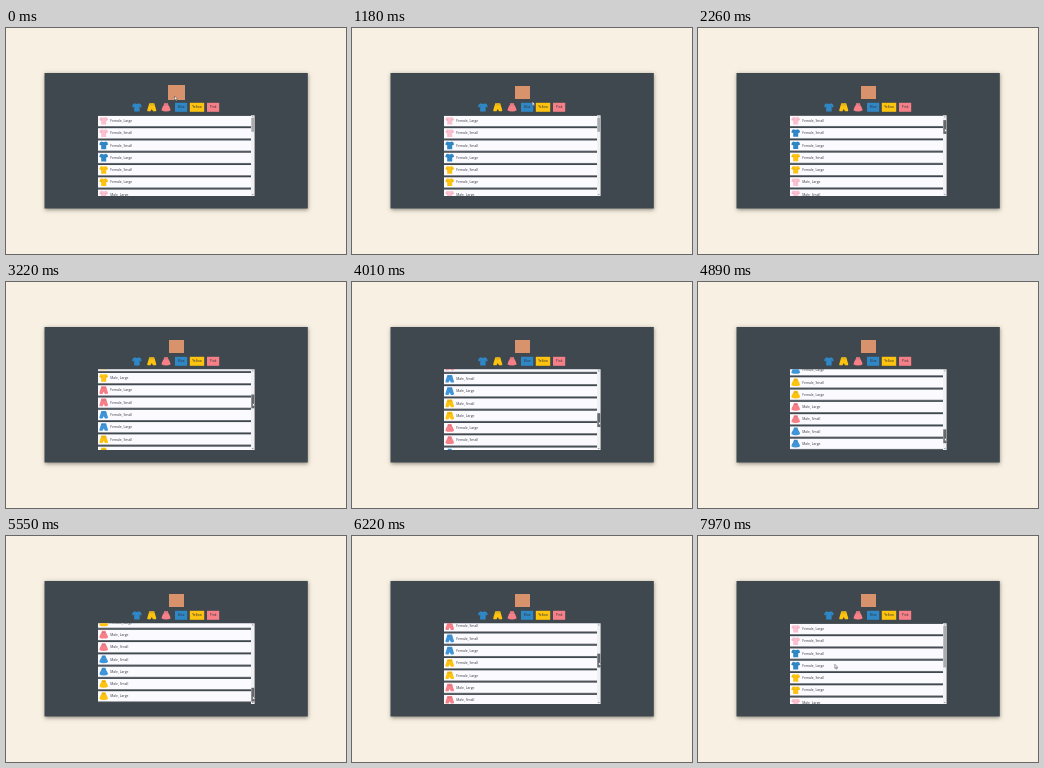
Write an HTML page with a canvas that moves like this. It is 340 px wide and 226 px high and loops after 8 s.

```html
<!DOCTYPE html>
<html lang="en">
<head>
<meta charset="utf-8">
<title>Clothes filter</title>
<style>
  html, body { margin: 0; width: 100%; height: 100%; overflow: hidden; background: #f8f1e3; }
  canvas { display: block; width: 340px; height: 226px; }
</style>
</head>
<body>
<canvas id="stage"></canvas>
<script>
const W = 340, H = 226, LOOP = 8000;
const canvas = document.getElementById('stage');
const ctx = canvas.getContext('2d');
const dpr = window.devicePixelRatio || 1;
canvas.width = W * dpr;
canvas.height = H * dpr;

const PANEL = '#3f484e', ROW = '#fbfaff';
const BLUE = '#2f87c6', YELLOW = '#fdc30f', PINK = '#f77f88';
const SHIRT_PINK = '#fbc0cf', LIST_BLUE = '#3f95d8';
const FONT = '"Open Sans", Lato, sans-serif';

const PITCH = 12.28, TOP = 87.9, ROW_H = 10.2;
const LIST = { x: 92, y: 87.3, w: 153, h: 80.7 };
const TRACK = { x: 245, y: 90, h: 75.6 };
const MAX_SCROLL = 362.5;
const FILTER_AT = 7200, DRAG_FROM = 2140, DRAG_TO = 6660;

// One group of twelve per garment: six female, then six male
const items = [];
for (const kind of ['shirt', 'shorts', 'skirt']) {
  for (const sex of ['Female', 'Male']) {
    const pink = kind === 'shirt' ? SHIRT_PINK : PINK;
    const blue = kind === 'shirt' ? BLUE : LIST_BLUE;
    [[pink, 'Large'], [pink, 'Small'], [blue, 'Small'],
     [blue, 'Large'], [YELLOW, 'Small'], [YELLOW, 'Large']]
      .forEach(([color, size]) => items.push({ kind, color, label: `${sex}, ${size}` }));
  }
}

const scrollKeys = [
  [2140, 0], [2260, 12.3], [2720, 58], [2890, 64], [3220, 132], [3380, 134],
  [4010, 241.5], [4550, 309], [5010, 346], [5300, MAX_SCROLL],
  [5750, MAX_SCROLL], [6250, 150], [6640, 0]
];
const cursorKeys = [
  [0, 168.5, 68], [800, 168.5, 68], [1500, 190, 78], [1930, 214, 80], [2140, 246.5, 98]
];
const releaseKeys = [
  [6660, 246.5, 98], [6800, 244, 98], [7130, 130.5, 78],
  [7600, 130.5, 78], [7930, 136.8, 128.3]
];

function at(keys, t, col = 1) {
  if (t <= keys[0][0]) return keys[0][col];
  for (let i = 1; i < keys.length; i++) {
    const a = keys[i - 1], b = keys[i];
    if (t <= b[0]) return a[col] + (b[col] - a[col]) * (t - a[0]) / (b[0] - a[0]);
  }
  return keys[keys.length - 1][col];
}

function rect(x, y, w, h, color) {
  ctx.fillStyle = color;
  ctx.fillRect(x, y, w, h);
}

function text(str, x, y, size, color, align = 'left') {
  ctx.font = `${size}px ${FONT}`;
  ctx.textAlign = align;
  ctx.textBaseline = 'middle';
  ctx.fillStyle = color;
  ctx.fillText(str, x, y);
}

// Garment outlines on a 10 by 9 box
const shapes = {
  shirt: new Path2D('M3 .3Q5 1.6 7 .3L9 1.2L10 3.7L8.1 4.5L7.8 4V8.8H2.2V4L1.9 4.5L0 3.7L1 1.2Z'),
  shorts: new Path2D('M2.4 .3H7.6L9.8 7.5Q9.7 8.8 8.4 8.8H6.3L5 6.2L3.7 8.8H1.6Q.3 8.8 .2 7.5Z'),
  skirt: new Path2D('M3 .3H7L7.4 2.2Q9.2 4.6 9.9 7.6Q8 8.9 5 8.9Q2 8.9 .1 7.6Q.8 4.6 2.6 2.2Z')
};

function garment(kind, color, x, y, scale) {
  ctx.save();
  ctx.translate(x, y);
  ctx.scale(scale, scale);
  ctx.fillStyle = color;
  ctx.fill(shapes[kind]);
  ctx.strokeStyle = 'rgba(60,60,70,.45)';
  ctx.lineWidth = .45;
  ctx.beginPath();
  if (kind === 'shirt') { ctx.moveTo(2.3, 4.2); ctx.lineTo(2.3, 3); ctx.moveTo(7.7, 4.2); ctx.lineTo(7.7, 3); }
  else { ctx.moveTo(2.6, 2); ctx.lineTo(7.4, 2); }
  ctx.stroke();
  ctx.restore();
}

function drawPanel() {
  rect(0, 0, W, H, '#f8f1e3');
  ctx.save();
  ctx.shadowColor = 'rgba(50,45,35,.5)';
  ctx.shadowBlur = 4 * dpr;
  ctx.shadowOffsetY = 1.3 * dpr;
  rect(38.5, 45, 263.3, 135.5, PANEL);
  ctx.restore();
}

function drawHeader(t) {
  const grow = t < 850 ? 1 : 0;
  rect(163 - grow, 58 - grow, 15 + 2 * grow, 13 + 2 * grow, '#d9936c');
  garment('shirt', BLUE, 126, 75, .98);
  garment('shorts', YELLOW, 141, 75, .95);
  garment('skirt', PINK, 155.3, 75, .95);
  [['Blue', 169, 12.2, BLUE], ['Yellow', 183.8, 14.4, YELLOW], ['Pink', 201, 12.2, PINK]]
    .forEach(([label, x, w, color]) => {
      rect(x, 74.8, w, 9, color);
      text(label, x + w / 2, 79.4, 3.3, '#30343a', 'center');
    });
}

function drawList(rows, scroll) {
  ctx.save();
  ctx.beginPath();
  ctx.rect(LIST.x, LIST.y, LIST.w, LIST.h);
  ctx.clip();
  rows.forEach((item, i) => {
    const y = TOP + i * PITCH - scroll;
    if (y < LIST.y - PITCH || y > LIST.y + LIST.h) return;
    rect(LIST.x, y + ROW_H, LIST.w, .7, '#777b82');
    rect(LIST.x, y, LIST.w, ROW_H, ROW);
    garment(item.kind, item.color, 93.2, y + .8, .9);
    text(item.label, 104.3, y + 5.3, 3.4, '#34343a');
  });
  ctx.restore();
}

function drawScrollbar(rows, scroll, dragging) {
  rect(TRACK.x, LIST.y, 3.6, LIST.h, '#f1f1f3');
  const content = rows.length * PITCH;
  const size = TRACK.h * LIST.h / content;
  const y = TRACK.y + (TRACK.h - size) * scroll / MAX_SCROLL;
  rect(TRACK.x + .3, y, 3, size, dragging ? '#66686c' : '#a9abae');
  ctx.fillStyle = '#77797d';
  for (const [tip, base] of [[88.2, 89.2], [167.1, 166.1]]) {
    ctx.beginPath();
    ctx.moveTo(246.8, tip);
    ctx.lineTo(247.8, base);
    ctx.lineTo(245.8, base);
    ctx.fill();
  }
  return y;
}

const arrow = new Path2D('M0 0V4.2L1 3.3L1.7 4.9L2.4 4.6L1.7 3.1H3Z');
function drawCursor(x, y) {
  ctx.save();
  ctx.translate(x, y);
  ctx.fillStyle = '#fff';
  ctx.strokeStyle = '#44464a';
  ctx.lineWidth = .5;
  ctx.fill(arrow);
  ctx.stroke(arrow);
  ctx.restore();
}

function draw(t) {
  ctx.setTransform(dpr, 0, 0, dpr, 0, 0);
  const rows = t >= FILTER_AT ? items.filter(i => i.kind === 'shirt') : items;
  const scroll = at(scrollKeys, t);
  const dragging = t >= DRAG_FROM && t < DRAG_TO;
  drawPanel();
  drawHeader(t);
  drawList(rows, scroll);
  const thumb = drawScrollbar(rows, scroll, dragging);
  if (dragging) {
    drawCursor(246.5, thumb + 8);
  } else {
    const keys = t < DRAG_FROM ? cursorKeys : releaseKeys;
    drawCursor(at(keys, t, 1), at(keys, t, 2));
  }
}

const start = performance.now();
function tick() {
  draw((performance.now() - start) % LOOP);
  requestAnimationFrame(tick);
}
tick();
</script>
</body>
</html>
```
